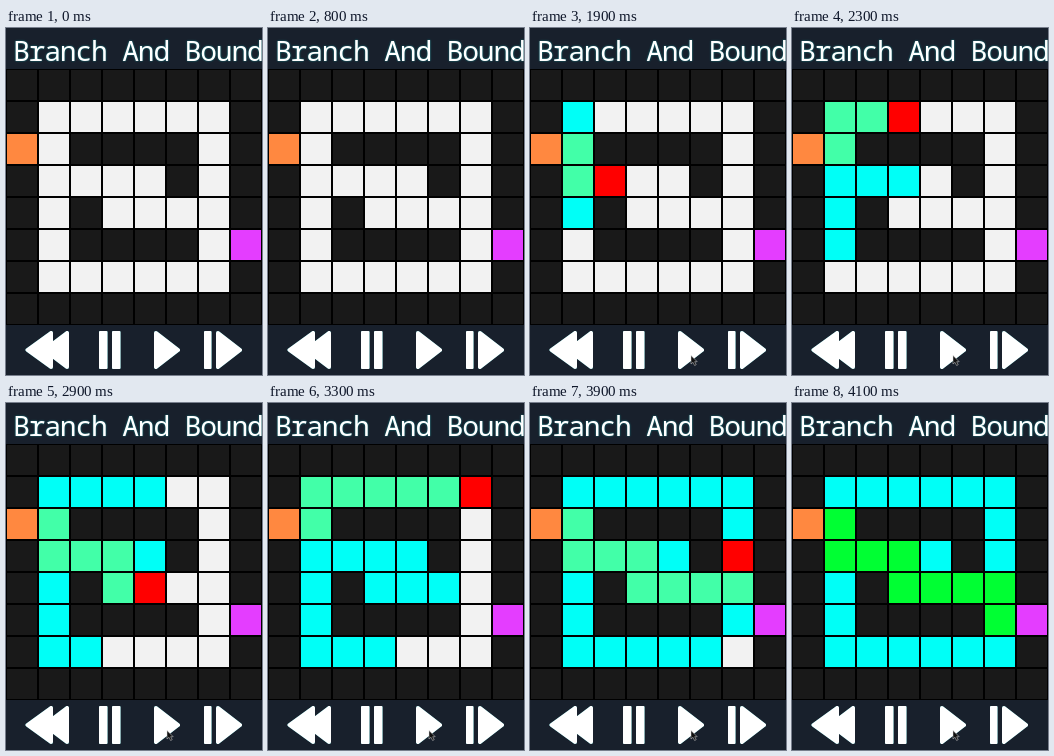
An HTML page with a canvas that plays this animation: 256 px wide and 347 px high, repeating every 5 s.

```html
<!DOCTYPE html>
<html lang="en">
<head>
<meta charset="utf-8">
<title>Branch And Bound</title>
<style>
  html, body { margin: 0; width: 100%; height: 100%; overflow: hidden; background: #18202c; }
  #stage { position: absolute; left: 0; top: 0; width: 256px; height: 347px; overflow: hidden; }
  h1 {
    position: absolute; left: 7px; top: 4px; margin: 0;
    font: 300 28px/36px "Noto Sans Mono", "DejaVu Sans Mono", monospace;
    letter-spacing: -1.2px; white-space: pre; color: #fff;
    text-shadow: 0 0 2px rgba(0, 255, 255, .45);
  }
  canvas { position: absolute; left: 0; top: 41px; }
  svg { position: absolute; left: 0; top: 0; }
  .icons { fill: #fff; filter: drop-shadow(0 0 .6px rgba(0, 255, 255, .5)); }
  .icons path { stroke: #fff; stroke-width: 4; stroke-linejoin: round; }
</style>
</head>
<body>
<div id="stage">
  <h1>Branch And Bound</h1>
  <canvas id="grid" width="256" height="256"></canvas>
  <svg width="256" height="347" viewBox="0 0 256 347">
    <g class="icons">
      <path d="M21.5 322L45 305V339ZM38.5 322L61 305V339Z"/>
      <rect x="93" y="303" width="8.5" height="38" rx="1"/>
      <rect x="106" y="303" width="8.5" height="38" rx="1"/>
      <path d="M150 305L172 322L150 339Z"/>
      <rect x="198" y="303" width="7.5" height="38" rx="1"/>
      <path d="M212 305L234 322L212 339Z"/>
    </g>
    <path id="cursor" d="M0 0V8.5L2 6.8L3.6 10L5.2 9.2L3.7 6.2H6.2Z"
          fill="#111" stroke="#ddd" stroke-width=".5"/>
  </svg>
</div>
<script>
const LOOP = 5000, TICK = 100, SEARCH_AT = 1500;
const CURSOR_IN = 1100, CURSOR_STOP = 1400;
const PITCH = 32, SIZE = 30;
const MAZE = [
  '########',
  '#......#',
  'S.####.#',
  '#....#.#',
  '#.#....#',
  '#.####.G',
  '#......#',
  '########'
];
const COLORS = {
  '#': '#191919', '.': '#f2f2f2', S: '#ff8840', G: '#e43dff',
  seen: '#00fff7', trail: '#42ffa8', head: '#ff0000', solved: '#00ff33'
};
const ctx = document.getElementById('grid').getContext('2d');
const cursor = document.getElementById('cursor');

const at = (r, c) => (MAZE[r] || '')[c] || '#';

// Breadth-first visit order; each node remembers its parent.
function search() {
  const queue = [{ r: 2, c: 1, parent: null }];
  const known = new Set(['2,1', '2,0']);
  const order = [];
  while (queue.length) {
    const node = queue.shift();
    order.push(node);
    if (at(node.r, node.c) === 'G') break;
    for (const [dr, dc] of [[1, 0], [0, 1], [-1, 0], [0, -1]]) {
      const r = node.r + dr, c = node.c + dc, key = r + ',' + c;
      if (at(r, c) === '#' || known.has(key)) continue;
      known.add(key);
      queue.push({ r, c, parent: node });
    }
  }
  return order;
}
const order = search();

function cell({ r, c }, color) {
  ctx.fillStyle = COLORS[color];
  ctx.fillRect(1 + PITCH * c, 1 + PITCH * r, SIZE, SIZE);
}

function drawGrid(step) {
  ctx.fillStyle = '#000';
  ctx.fillRect(0, 0, 256, 256);
  MAZE.forEach((row, r) => [...row].forEach((kind, c) => cell({ r, c }, kind)));
  if (step < 0) return;
  const last = Math.min(step, order.length - 1);
  const head = order[last];
  const solved = at(head.r, head.c) === 'G';
  order.slice(0, last).forEach(node => cell(node, 'seen'));
  for (let n = head.parent; n; n = n.parent) cell(n, solved ? 'solved' : 'trail');
  cell(head, solved ? 'G' : 'head');
}

function drawCursor(t) {
  const p = Math.min(1, (t - CURSOR_IN) / (CURSOR_STOP - CURSOR_IN));
  const left = (1 - p) ** 2;
  cursor.style.visibility = p < 0 ? 'hidden' : 'visible';
  cursor.setAttribute('transform', `translate(${161 + 6 * left} ${327.5 + 15 * left})`);
}

let shown = -1;
function frame() {
  const t = Math.floor(performance.now() % LOOP / TICK) * TICK;
  if (t !== shown) {
    shown = t;
    drawGrid((t - SEARCH_AT) / TICK);
    drawCursor(t);
  }
  requestAnimationFrame(frame);
}
frame();
</script>
</body>
</html>
```
